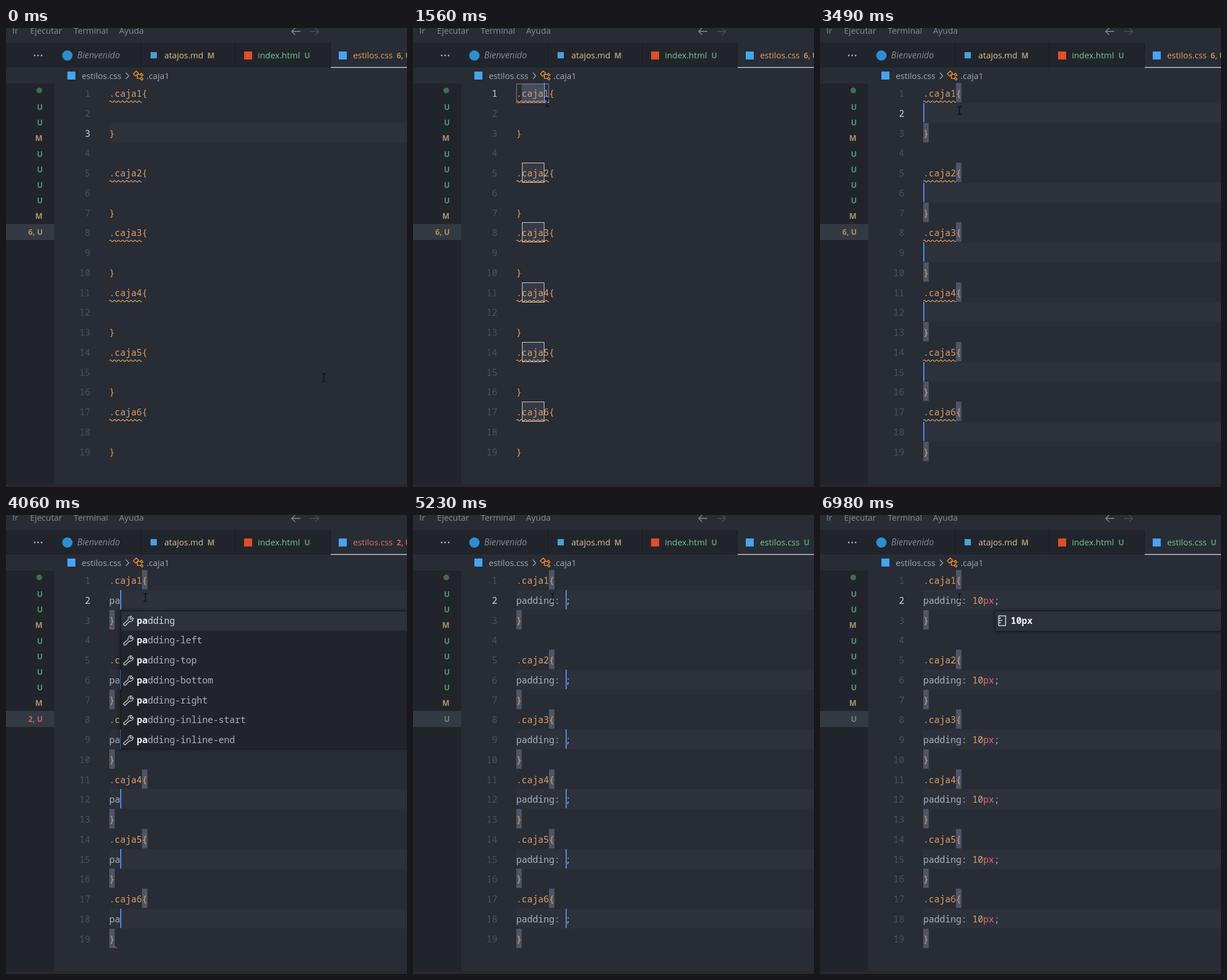
These frames come from a looping animation (699x801 px, 7030 ms). An HTML page with a canvas:

```html
<!DOCTYPE html>
<html lang="es">
<head>
<meta charset="utf-8">
<title>Multicursor</title>
<style>
html, body { margin: 0; width: 100%; height: 100%; overflow: hidden; background: #282c34; }
canvas { display: block; }
</style>
</head>
<body>
<canvas id="stage" width="699" height="801"></canvas>
<script>
const ctx = document.getElementById('stage').getContext('2d');
const LOOP = 7030, TOP = 96, ROW = 34.75, LEFT = 180, CHAR = 9.5, BASE = 24;
const MONO = '15.83px "Noto Sans Mono", monospace', CODE = '500 ' + MONO;
const UI = '14.8px "Open Sans", sans-serif';
const BADGE = '700 13.4px "Open Sans", sans-serif';
const BG = '#282c34', DARK = '#21252b', EDGE = '#181a1f', LINE = '#2c313a';
const TEXT = '#abb2bf', ORANGE = '#dfa066', RED = '#e06c75', GREEN = '#73c991', SAND = '#e2c08d';
const DIMGREEN = '#549572', DIMSAND = '#b0946c';

// First line of each rule
const RULES = [1, 5, 8, 11, 14, 17];
const ITEMS = ['', '-left', '-top', '-bottom', '-right', '-inline-start', '-inline-end'];

const CLICK = 900, SELECTED = 1300, BOXES = 1450, ADD = 1620, ADD_STEP = 95, DOWN = 3200;
const TYPING = [
  [3800, 'p'], [3950, 'pa'], [4100, 'pad'], [4250, 'padd'],
  [4750, 'padding: ;'], [5450, 'padding: 1;'], [5750, 'padding: 10;'],
  [6200, 'padding: 10p;'], [6430, 'padding: 10px;']
];
// time, x, y of the pointer
const MOUSE = [[0, 554, 610], [120, 554, 610], [800, 190, 122], [CLICK, 190, 122],
  [SELECTED, 231, 124], [1540, 234, 130], [2170, 234, 130], [2320, 243, 144], [LOOP, 243, 144]];

const rowY = n => Math.round(TOP + (n - 1) * ROW);
const colX = c => LEFT + c * CHAR;

function rect(x, y, w, h, color) {
  ctx.fillStyle = color;
  ctx.fillRect(x, y, w, h);
}

function frame(x, y, w, h, color) {
  ctx.strokeStyle = color;
  ctx.lineWidth = 1;
  ctx.strokeRect(Math.round(x) + .5, Math.round(y) + .5, Math.round(w), Math.round(h));
}

function text(s, x, y, color, font = UI, align = 'left') {
  ctx.font = font;
  ctx.textAlign = align;
  ctx.fillStyle = color;
  ctx.fillText(s, x, y);
}

function disc(x, y, r, color) {
  ctx.fillStyle = color;
  ctx.beginPath();
  ctx.arc(x, y, r, 0, 7);
  ctx.fill();
}

function stroke(path, color, width = 1.3, x = 0, y = 0) {
  ctx.save();
  ctx.translate(x, y);
  ctx.strokeStyle = color;
  ctx.lineWidth = width;
  ctx.lineJoin = 'round';
  ctx.stroke(new Path2D(path));
  ctx.restore();
}

function squiggle(x, y, w, color) {
  ctx.strokeStyle = color;
  ctx.lineWidth = 1.2;
  ctx.beginPath();
  for (let i = 0; i <= w; i++) ctx.lineTo(x + i, y - 1.4 * Math.sin(i * Math.PI / 3.6));
  ctx.stroke();
}

function drawChrome(status) {
  rect(0, 0, 699, 801, BG);
  [['Ir', 11], ['Ejecutar', 42], ['Terminal', 118], ['Ayuda', 197]]
    .forEach(([s, x]) => text(s, x, 10, '#858b96'));
  stroke('M0 0H15M6 -6L0 0L6 6', '#8b919c', 1.3, 498, 6);
  stroke('M0 0H15M9 -6L15 0L9 6', '#4b515c', 1.3, 530, 6);

  rect(0, 26, 699, 43, DARK);
  rect(566, 26, 133, 43, BG);
  [235, 399, 565].forEach(x => rect(x, 26, 1, 43, EDGE));
  rect(566, 68, 133, 1.5, '#c5c8ce');
  [50, 56, 62].forEach(x => disc(x, 48, 1.4, '#b4bac4'));

  disc(107, 48, 9, '#2b8fd4');
  text('Bienvenido', 124, 53, '#858b96', 'italic 15.4px "Open Sans", sans-serif');
  rect(252, 42, 11, 11, '#4a9fd8');
  text('atajos.md', 276, 53, SAND);
  text('M', 351, 53, DIMSAND, BADGE);
  rect(415, 41, 14, 14, '#e44d26');
  text('index.html', 439, 53, GREEN);
  text('U', 520, 53, DIMGREEN, BADGE);
  rect(580, 41, 14, 14, '#42a5f5');
  text('estilos.css', 605, 53, status.color);
  text(status.label, 681, 53, status.dim, BADGE);

  rect(107, 76, 14, 14, '#42a5f5');
  text('estilos.css', 132, 89, '#a3a9b4');
  stroke('M0 0L5 5.5L0 11', '#a3a9b4', 1.3, 209, 78);
  stroke('M5 0L9 4L4 9L0 5ZM6 6H12M7 6V13H12M14 4L17 7L15 9L12 6ZM14 11L17 14L15 16L12 13Z',
    '#e98a2b', 1.6, 222, 75);
  text('.caja1', 245, 89, '#a3a9b4');
}

function drawSidebar(status) {
  rect(0, 97, 84, 699, DARK);
  rect(0, 342, 84, 28, '#333a43');
  disc(58, 109, 5, '#426b57');
  [...'UUMUUUUM'].forEach((s, i) =>
    text(s, s === 'M' ? 51 : 54, 143 + i * 27.2, s === 'M' ? DIMSAND : DIMGREEN, BADGE));
  text(status.label, 64, 361, status.dim, BADGE, 'right');
  rect(0, 796, 699, 5, '#2c2631');
}

function drawCode(typed, active) {
  for (let n = 1; n <= 19; n++)
    text(n, 147, rowY(n) + BASE, n === active ? '#ccd1da' : '#495162', MONO, 'right');
  RULES.forEach((n, i) => {
    text(`.caja${i + 1}{`, LEFT, rowY(n) + BASE, ORANGE, CODE);
    text('}', LEFT, rowY(n + 2) + BASE, ORANGE, CODE);
    const y = rowY(n + 1) + BASE;
    text(typed.slice(0, 9), LEFT, y, TEXT, CODE);
    const [, digits, unit] = typed.slice(9).match(/^(\d*)(\w*)/);
    text(digits, colX(9), y, ORANGE, CODE);
    text(unit, colX(9 + digits.length), y, RED, CODE);
    if (typed.endsWith(';')) text(';', colX(typed.length - 1), y, TEXT, CODE);
  });
}

function popup(x, rows) {
  const y = rowY(3) + 1, h = rows * ROW - 2;
  ctx.shadowColor = '#0008';
  ctx.shadowBlur = 7;
  rect(x, y, 720 - x, h, DARK);
  ctx.shadowBlur = 0;
  rect(x, y, 720 - x, ROW, LINE);
  frame(x, y, 720 - x, h, EDGE);
}

// Suggestion text with the typed part in bold
function suggestion(label, typedCount, x, y, color) {
  text(label.slice(0, typedCount), x, y, '#f2f4f7', 'bold ' + MONO);
  text(label.slice(typedCount), x + typedCount * CHAR, y, color, CODE);
}

function propertyList(x, count) {
  popup(x, ITEMS.length);
  ITEMS.forEach((tail, i) => {
    const y = rowY(3 + i);
    stroke('M0 14L8 7C7 3 10 0 14 1L11 4L13 6L16 3C18 7 14 11 10 10L3 17Q0 17 0 14Z',
      '#c3c8d0', 1.4, x + 5, y + 10);
    suggestion('padding' + tail, count, x + 28, y + BASE, i ? TEXT : '#d5d9e0');
  });
}

function unitList(x, count) {
  popup(x, 1.1);
  const y = rowY(3);
  stroke('M0 0H12V17H0ZM0 4H4M0 8H6M0 12H4', '#d5d9e0', 1.5, x + 7, y + 10);
  suggestion('10px', count, x + 28, y + BASE, '#d5d9e0');
}

function pointer(t) {
  const k = MOUSE.findIndex(p => p[0] > t);
  const [t0, x0, y0] = MOUSE[k - 1], [t1, x1, y1] = MOUSE[k];
  const p = (t - t0) / (t1 - t0), e = p * p * (3 - 2 * p);
  stroke('M-3.5 -7Q0 -7 0 -5Q0 -7 3.5 -7M0 -5V5M-3.5 7Q0 7 0 5Q0 7 3.5 7', '#0d0f12', 1.3,
    x0 + (x1 - x0) * e, y0 + (y1 - y0) * e);
}

function draw(t) {
  const step = TYPING.filter(s => s[0] <= t).pop();
  const typed = step ? step[1] : '';
  const status = t < 3920 ? { label: '6, U', color: ORANGE, dim: '#b98a5a' }
    : t < 5200 ? { label: '2, U', color: '#e5705f', dim: '#c4675c' }
    : { label: 'U', color: GREEN, dim: DIMGREEN };
  const selecting = t >= CLICK && t < DOWN, editing = t >= DOWN;
  const added = t < ADD ? 1 : Math.min(6, 2 + Math.floor((t - ADD) / ADD_STEP));
  const chars = Math.round(4 * Math.min(1, (t - CLICK) / (SELECTED - CLICK)));
  const lastKey = step ? step[0] : editing ? DOWN : t >= ADD ? ADD + (added - 2) * ADD_STEP : SELECTED;
  const caretOn = t < lastKey || Math.floor((t - lastKey) / 500) % 2 === 0;
  const caretCol = typed.length - typed.endsWith(';');
  const caret = (x, n) => caretOn && rect(Math.round(x), rowY(n), 2, ROW - 1, '#528bff');

  drawChrome(status);
  drawSidebar(status);

  if (t < CLICK) rect(LEFT, rowY(3), 519, ROW, LINE);
  if (editing) RULES.forEach(n => {
    rect(LEFT, rowY(n + 1), 519, ROW, LINE);
    rect(colX(6), rowY(n), CHAR, ROW - 1, '#4d5667');
    rect(LEFT, rowY(n + 2), CHAR, ROW - 1, '#4d5667');
  });
  if (selecting) RULES.forEach((n, i) => {
    if (i < added) rect(colX(1), rowY(n) + 1, chars * CHAR, ROW - 1, '#444c5e');
    else if (t >= BOXES) {
      rect(colX(1), rowY(n), 4 * CHAR, ROW - 1, '#353a45');
      frame(colX(1), rowY(n), 4 * CHAR, ROW - 1, '#d2d5da');
    }
  });
  if (t >= BOXES && t < ADD) frame(LEFT, rowY(1) + 1, 6 * CHAR - 1, ROW - 2, '#858a93');

  drawCode(typed, t < CLICK ? 3 : editing ? 2 : 1);

  if (t < 3920) RULES.forEach(n => squiggle(LEFT, rowY(n) + 32.5, 57, ORANGE));
  else if (t < 4900) {
    squiggle(LEFT, rowY(3) + 32, 9, '#e0443e');
    squiggle(187, rowY(19) + 32, 7, '#e0443e');
  }
  if (selecting) RULES.slice(0, added).forEach(n => caret(colX(1 + chars), n));
  if (editing) RULES.forEach(n => caret(colX(caretCol), n + 1));

  if (typed && typed.length < 5) propertyList(colX(caretCol) + 1, caretCol);
  if (/px?;/.test(typed)) unitList(colX(caretCol) + 1, caretCol - 9);
  pointer(t);
}

function tick() {
  draw(performance.now() % LOOP);
  requestAnimationFrame(tick);
}
tick();
</script>
</body>
</html>
```
